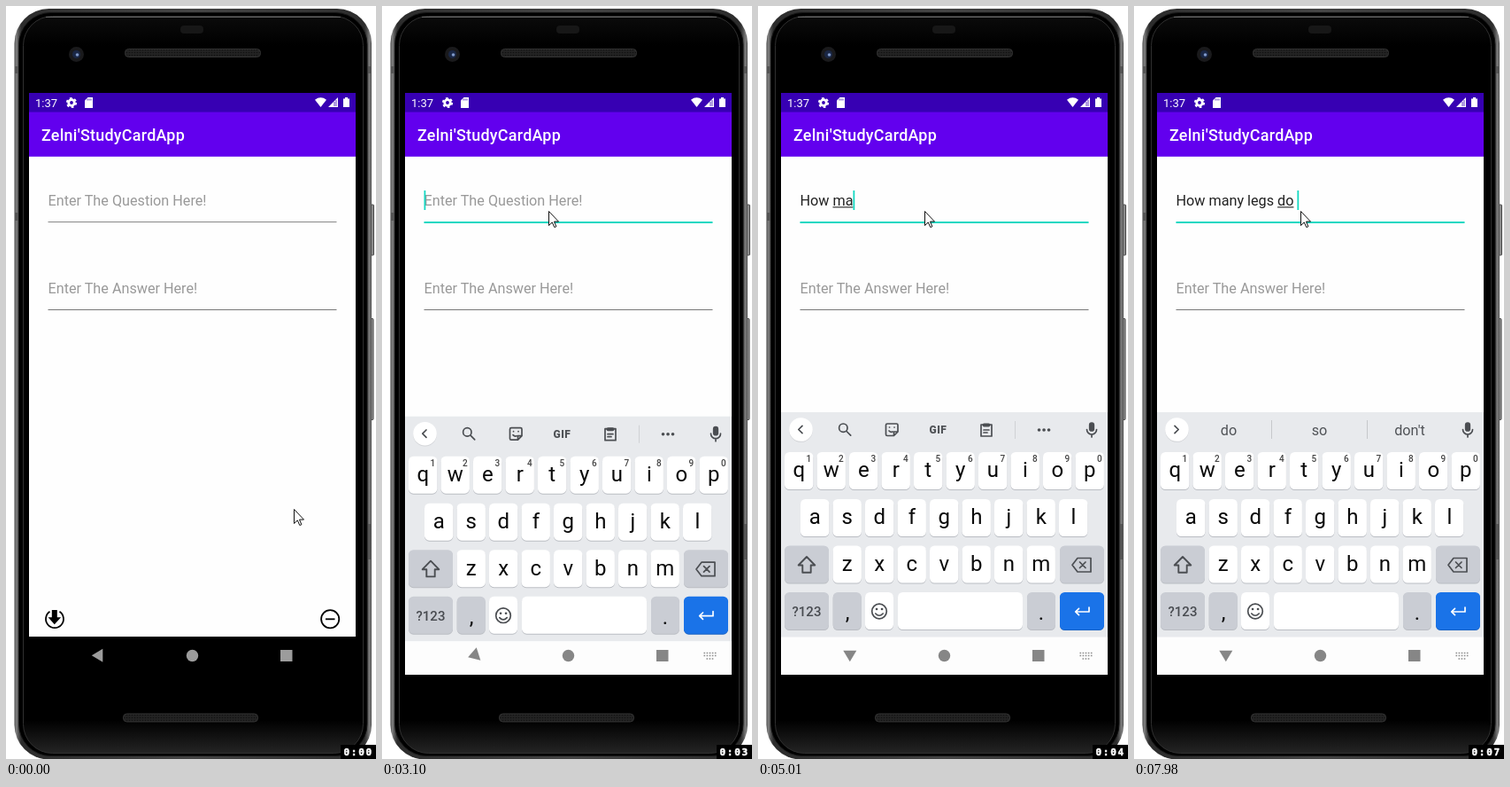
Animation, 418 px wide and 849 px high, one loop 8 s. Source, as an HTML page:

```html
<!DOCTYPE html>
<html lang="en">
<head>
<meta charset="utf-8">
<title>Flash card app</title>
<style>
  html, body { margin: 0; width: 100%; height: 100%; overflow: hidden; background: #fff; }
  svg { display: block; width: 418px; height: 849px; font-family: Roboto, sans-serif; }
  text { white-space: pre; }
  .field { font-size: 16.2px; fill: #222; }
  .hint { fill: #999; }
  .mid { text-anchor: middle; }
  .letter { font-size: 24px; fill: #0a0a0a; }
  .digit { font-size: 10px; font-weight: 500; fill: #444; }
  .sug { font-size: 16.2px; fill: #505357; }
  .line { fill: none; stroke: #4b4e52; stroke-width: 1.7; stroke-linejoin: round; stroke-linecap: round; }
  .clock { font: bold 11px "DejaVu Sans Mono", monospace; letter-spacing: 1.7px; fill: #fff; stroke: #fff; stroke-width: .5; }
</style>
</head>
<body>
<svg viewBox="0 0 418 849">
  <defs>
    <linearGradient id="rim">
      <stop offset="0" stop-color="#484848"/><stop offset=".005" stop-color="#808080"/>
      <stop offset=".013" stop-color="#4a4a4a"/><stop offset=".02" stop-color="#2c2c2c"/>
      <stop offset=".5" stop-color="#444"/>
      <stop offset=".98" stop-color="#2c2c2c"/><stop offset=".987" stop-color="#4a4a4a"/>
      <stop offset=".995" stop-color="#808080"/><stop offset="1" stop-color="#484848"/>
    </linearGradient>
    <linearGradient id="glass" x2="0" y2="1">
      <stop offset="0" stop-color="#0b0b0b"/><stop offset=".04" stop-color="#000"/>
      <stop offset=".955" stop-color="#000"/><stop offset="1" stop-color="#242424"/>
    </linearGradient>
    <pattern id="mesh" width="3" height="3" patternUnits="userSpaceOnUse">
      <rect width="3" height="3" fill="#232323"/><circle cx="1.5" cy="1.5" r=".8" fill="#111"/>
    </pattern>
  </defs>

  <g id="phone">
    <g fill="#8a8a8a" stroke="#4a4a4a">
      <rect x="410.5" y="224" width="5" height="57" rx="1"/>
      <rect x="410.5" y="352.5" width="4.5" height="114" rx="1"/>
    </g>
    <rect x="9.5" y="3" width="403.5" height="846.5" rx="39" fill="url(#rim)"/>
    <path d="M10 68h4v8h-4zM10 233h4v9h-4zM408.5 68h4v8h-4zM408.5 584h4v40h-4z" fill="#555"/>
    <rect x="14.5" y="7.5" width="393.5" height="838" rx="36" fill="#000" stroke="#161616"/>
    <rect x="19.5" y="11.5" width="384" height="831" rx="33" fill="url(#glass)" stroke="#303030"/>
    <path d="M45 12.5H378" stroke="#666"/>
    <rect x="197" y="22" width="26" height="9" rx="4" fill="#171717"/>
    <circle cx="79.5" cy="54.5" r="8.5" fill="#1a1a1c"/>
    <circle cx="79.5" cy="54.5" r="4.5" fill="#1a2745"/>
    <circle cx="80.5" cy="55" r="1.8" fill="#7f98c8"/>
    <g fill="url(#mesh)" stroke="#333">
      <rect x="134.5" y="48.5" width="153" height="9" rx="4"/>
      <rect x="132.5" y="798" width="152" height="9" rx="4"/>
    </g>
  </g>

  <g id="app">
    <rect x="26" y="98" width="369" height="613" fill="#fefefe"/>
    <rect x="26" y="119" width="369" height="50.8" fill="#6200ee"/>
    <rect x="26" y="98" width="369" height="21.6" fill="#3700b3"/>
    <g fill="#fff">
      <text x="33" y="114" font-size="13">1:37</text>
      <circle cx="74" cy="109" r="3.3" fill="none" stroke="#fff" stroke-width="2.8"/>
      <circle cx="74" cy="109" r="5.2" fill="none" stroke="#fff" stroke-width="1.8" stroke-dasharray="2.7 2.745"/>
      <path d="M92.5 103H98v12H89v-8.5z"/>
      <path d="M349 105.7q6.5-4.7 13 0L355.5 114z"/>
      <path d="M375 103v11H364zM381 104.5h2V103h3v1.5h2V114h-7z"/>
      <text x="40" y="152" font-size="17.95" font-weight="500" letter-spacing=".25">Zelni'StudyCardApp</text>
    </g>
    <path d="M92 104.5v2M94 104.5v2M96 104.5v2M371 108v5M373 106v7" stroke="#3700b3" stroke-width=".8"/>
    <text id="hint" class="field hint" x="47.5" y="225">Enter The Question Here!</text>
    <text class="field hint" x="47.5" y="324">Enter The Answer Here!</text>
    <rect id="rule" x="47.5" y="243" width="326"/>
    <rect x="47.5" y="342" width="326" height="1" fill="#777"/>
    <text id="entry" class="field" x="47.5" y="225"></text>
    <rect id="mark" y="226.3" height="1.1" fill="#222"/>
    <rect id="caret" y="208" width="1.8" height="22" fill="#14d8c2"/>
    <g fill="none" stroke="#000" stroke-width="1.8">
      <path d="M49.5 682.8A10 10 0 1 0 60.5 682.8"/>
      <circle cx="366.2" cy="691.3" r="10.1"/><path d="M361 691.3h10.5"/>
    </g>
    <path d="M51.8 681h6v8.300h4.300L54.800 697.300 47.600 689.300h4.200z"/>
  </g>

  <rect id="navBar" x="26" y="711" width="369" height="43" fill="#fdfdfd"/>
  <g id="keyboard">
    <rect x="26" y="458" width="369" height="253.5" fill="#e8eaed"/>
    <circle cx="48.5" cy="478.5" r="13.3" fill="#d3d5d8"/>
    <circle cx="48.5" cy="477.5" r="13.3" fill="#fff"/>
    <path id="chevron" class="line" d="M-2 -4.2L2.2 0L-2 4.2"/>
    <g class="line">
      <rect x="374.7" y="470" width="4.6" height="9" rx="2.3" fill="#4b4e52"/>
      <path d="M371.5 477.5a5.5 5.5 0 0 0 11 0M377 483v3"/>
    </g>
    <g id="tools">
      <g class="line">
        <circle cx="96.3" cy="475.7" r="4.7"/><path d="M100 479.5l4.7 4.7"/>
        <path d="M146 471h10.5q1.5 0 1.5 1.5V480l-4.5 4.5H146q-1.5 0-1.5-1.5v-10.5q0-1.5 1.5-1.5zM153.5 484v-4h4M148 479q2 2 4 1"/>
        <path d="M148.5 475h.1M154 475h.1"/>
        <path d="M252 472h12v13h-12zM255 478h6M255 481h4"/>
        <path d="M255.5 472.5h5" stroke-width="4"/>
      </g>
      <text class="mid" x="203.5" y="482" font-size="12" font-weight="900" fill="#505357" letter-spacing=".5">GIF</text>
      <path d="M290.5 468v20" stroke="#cfd1d4"/>
      <path d="M317.5 478h.1M323 478h.1M328.5 478h.1" class="line" style="stroke-width:3.6"/>
    </g>
    <g id="suggestions">
      <path d="M155.5 467v21M263.5 467v21" stroke="#c6c8cb"/>
      <text class="sug mid" x="107" y="484"></text>
      <text class="sug mid" x="209.5" y="484"></text>
      <text class="sug mid" x="311.5" y="484"></text>
    </g>
    <g id="keys"></g>
    <g class="line">
      <path d="M55 621L45.700 630.500H50.300V638.700H59.700V630.500H64.300Z" stroke-width="1.900"/>
      <path d="M361 622.5H376V638H361L355 630.3ZM363.5 627l6.5 6.5M370 627l-6.5 6.5"/>
      <circle cx="137" cy="682.5" r="8.3"/>
      <path d="M132.800 685q4.200 4.500 8.400 0"/>
      <path d="M134 680h.1M140 680h.1" stroke-width="2.6"/>
      <path d="M374 678v5H359M362.5 679.3L358.7 683l3.8 3.7" stroke="#fff"/>
    </g>
  </g>

  <g id="nav">
    <path id="back" d="M-7 0L5.5 -7.5V7.5Z"/>
    <circle cx="210.5" cy="732.5" r="6.7"/>
    <rect x="310" y="726" width="13.5" height="13"/>
    <path id="imeIcon" d="M363.5 729.5h14M363.5 732.5h14M366.5 736h8" stroke-dasharray="1.6 1.5" stroke-width="1.5"/>
  </g>
  <path id="mouse" d="M.5 .5V16.5L4.3 12.900L6.800 18.500L8.900 17.700L6.500 12.100H11.500Z" fill="#fff" stroke="#111"/>
  <rect x="378" y="833" width="40" height="16"/>
  <text id="clock" class="clock" x="381.5" y="845"></text>
</svg>
<script>
const LOOP = 8000;
const $ = id => document.getElementById(id);
const NS = "http://www.w3.org/2000/svg";

function add(tag, attrs, content = "") {
  const el = document.createElementNS(NS, tag);
  for (const name in attrs) el.setAttribute(name, attrs[name]);
  el.textContent = content;
  $("keys").append(el);
}

function addKey(x, y, width, fill = "#fff", shadow = "#babdc3") {
  const box = { x, width, height: 42, rx: 5.5 };
  add("rect", { ...box, y: y + 1, fill: shadow });
  add("rect", { ...box, y, fill });
}

function addLetters(letters, firstCenter, y, digits = "") {
  [...letters].forEach((letter, i) => {
    const center = firstCenter + i * 36.5;
    addKey(center - 16.3, y, 32.4);
    add("text", { x: center, y: y + 28.4, class: "letter mid" }, letter);
    if (digits) add("text", { x: center + 11, y: y + 11, class: "digit mid" }, digits[i]);
  });
}

const GRAY = "#cacdd4";
addLetters("qwertyuiop", 46.3, 503, "1234567890");
addLetters("asdfghjkl", 64.3, 556);
addLetters("zxcvbnm", 100.8, 608.5);
addKey(30, 608.5, 50, GRAY);
addKey(341, 608.5, 50, GRAY);
addKey(30, 661, 50, GRAY);
addKey(84.7, 661, 32, GRAY);
addKey(121, 661, 32);
addKey(158, 661, 141);
addKey(304, 661, 32, GRAY);
addKey(341, 661, 50, "#1a73e8", "#1a63c4");
add("text", { x: 55, y: 688, class: "mid", "font-size": 15, "font-weight": 500, fill: "#484b50" }, "?123");
add("text", { x: 101, y: 692, class: "letter mid", "font-size": 20 }, ",");
add("text", { x: 320, y: 692, class: "letter mid", "font-size": 20 }, ".");

// Each step changes part of the state; brackets mark the underlined word.
const steps = [
  [0, { mouse: [325, 567], sec: 0, text: "", focus: false, caret: false, ime: false, keyboard: null, tilt: 0, words: null }],
  [940, { sec: 1 }],
  [1880, { mouse: [318, 549] }],
  [1980, { mouse: [290, 470], sec: 2 }],
  [2100, { mouse: [254, 369] }],
  [2250, { mouse: [197, 293] }],
  [2400, { mouse: [197, 244] }],
  [2550, { mouse: [191, 231] }],
  [2710, { mouse: [188, 231] }],
  [2830, { focus: true, caret: true, sec: 3 }],
  [2950, { ime: true }],
  [3100, { keyboard: 4.7, tilt: -18 }],
  [3220, { keyboard: 0, tilt: -90, caret: false }],
  [3660, { text: "[H]", caret: true }],
  [3940, { text: "[How]", words: ["Ho", "How", "Hi"] }],
  [4040, { text: "[How] ", words: ["How", "Hows", "Howl"], sec: 4 }],
  [4350, { text: "How ", words: ["many", "much", "are"] }],
  [4770, { text: "How [m]", words: null }],
  [5010, { text: "How [ma]" }],
  [5110, { sec: 5 }],
  [5230, { text: "How [man]", words: ["ma", "man", "may"] }],
  [5380, { text: "How [many]", words: ["man", "many", "main"] }],
  [5530, { text: "How [many] ", words: ["many", "Many", ""] }],
  [5650, { text: "How many ", words: ["people", "times", "of"] }],
  [5770, { text: "How many [l]", words: null }],
  [5890, { text: "How many [le]", words: ["l", "left", "like"] }],
  [6050, { text: "How many [leg]", words: ["le", "left", "let"], sec: 6 }],
  [6150, { text: "How many [leg]s", words: ["leg", "legs", "let"] }],
  [6400, { text: "How many [legs]", words: ["legs", "Legs", ""] }],
  [6960, { text: "How many [legs] " }],
  [7080, { text: "How many legs ", sec: 7 }],
  [7200, { words: ["and", "are", "do"] }],
  [7580, { text: "How many legs [d]" }],
  [7710, { text: "How many legs [do]" }],
  [7850, { words: ["do", "so", "don't"] }],
  [7980, { text: "How many legs [do] " }]
];
const states = [];
for (const [, change] of steps) states.push({ ...states.at(-1), ...change });

const show = (id, on) => { $(id).style.display = on ? "" : "none"; };
const set = (id, name, value) => $(id).setAttribute(name, value);

function drawEntry({ text, caret }) {
  const [before, word = ""] = text.split(/[\[\]]/);
  const entry = $("entry");
  entry.textContent = text.replace(/[\[\]]/g, "");
  const widthOf = n => n ? entry.getSubStringLength(0, n) : 0;
  const start = widthOf(before.length);
  set("mark", "x", 47.5 + start);
  set("mark", "width", widthOf(before.length + word.length) - start);
  set("caret", "x", 47.5 + widthOf(entry.textContent.length));
  show("caret", caret);
  show("hint", !text);
}

function draw(state) {
  const { mouse, focus, ime, keyboard, tilt, words, sec } = state;
  const open = keyboard !== null;
  set("mouse", "transform", `translate(${mouse})`);
  set("rule", "height", focus ? 2 : 1);
  set("rule", "fill", focus ? "#14d8c2" : "#888");
  drawEntry(state);
  show("keyboard", open);
  show("navBar", open);
  set("keyboard", "transform", `translate(0 ${keyboard || 0})`);
  show("tools", !words);
  show("suggestions", words);
  set("chevron", "transform", `translate(48 477.5) scale(${words ? 1 : -1} 1)`);
  document.querySelectorAll(".sug").forEach((el, i) => { el.textContent = words ? words[i] : ""; });
  set("nav", "fill", open ? "#868686" : "#9c9c9c");
  set("back", "transform", `translate(103.8 732.2) rotate(${tilt})`);
  set("imeIcon", "stroke", open ? "#8c8c8c" : "#9c9c9c");
  show("imeIcon", ime);
  $("clock").textContent = "0:0" + sec;
}

const origin = performance.now();
let current = -1;
function tick() {
  const time = (performance.now() - origin) % LOOP;
  const index = steps.findLastIndex(([at]) => at <= time);
  if (index !== current) draw(states[current = index]);
  requestAnimationFrame(tick);
}
tick();
</script>
</body>
</html>
```
